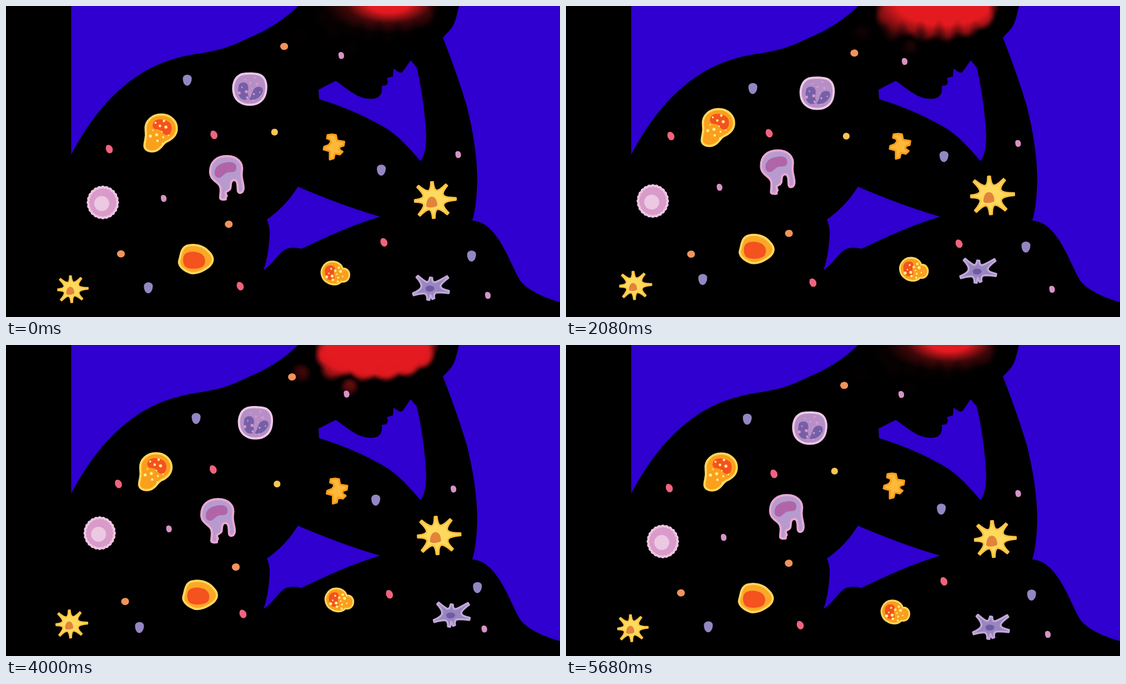
These frames come from a looping animation (998 by 561 pixels, 5.76 s). An HTML page with a canvas:

```html
<!DOCTYPE html>
<html lang="en">
<head>
<meta charset="utf-8">
<title>Drifting cells</title>
<style>
html, body { margin: 0; width: 100%; height: 100%; overflow: hidden; background: #000; }
canvas { display: block; width: 100vw; height: 100vh; }
</style>
</head>
<body>
<canvas id="stage" width="998" height="561"></canvas>
<script>
const ctx = document.getElementById('stage').getContext('2d');
const LOOP = 5760, STEP = 80, ORBIT = LOOP - STEP;
const TAU = Math.PI * 2;
const clamp = v => Math.max(0, Math.min(1, v));

// ---------- painting helpers ----------
const path = d => new Path2D(d);

function paint(shape, fill, edge, width) {
  ctx.fillStyle = fill;
  ctx.fill(shape);
  if (edge) {
    ctx.strokeStyle = edge;
    ctx.lineWidth = width;
    ctx.stroke(shape);
  }
}

// Grains spread over an ellipse in a sunflower spiral.
function grains(count, x, y, rx, ry) {
  const p = new Path2D();
  for (let i = 0; i < count; i++) {
    const d = Math.sqrt((i + 0.5) / count), a = i * 2.4, r = 1.4 + (i * 7 % 4) * 0.45;
    const gx = x + rx * d * Math.cos(a), gy = y + ry * d * Math.sin(a);
    p.moveTo(gx + r, gy);
    p.arc(gx, gy, r, 0, TAU);
  }
  return p;
}

// Rounded arms reaching out to the given tips.
function starPath(tips) {
  const p = new Path2D(), n = tips.length;
  const valley = i => {
    const [a, b] = tips[i % n], [c, d] = tips[(i + 1) % n];
    return [(a + c) * 0.29, (b + d) * 0.29];
  };
  p.moveTo(...valley(n - 1));
  tips.forEach(([x, y], i) => {
    const len = Math.hypot(x, y), nx = -y / len * 2, ny = x / len * 2;
    p.quadraticCurveTo(x * 0.55 - nx * 1.4, y * 0.55 - ny * 1.4, x - nx, y - ny);
    p.lineTo(x + nx, y + ny);
    p.quadraticCurveTo(x * 0.55 + nx * 1.4, y * 0.55 + ny * 1.4, ...valley(i));
  });
  p.closePath();
  return p;
}

function ruffle(rx, ry, bumps, depth) {
  const p = new Path2D();
  for (let i = 0; i < 180; i++) {
    const a = i / 180 * TAU, k = 1 + depth * Math.cos(a * bumps);
    p.lineTo(rx * k * Math.cos(a), ry * k * Math.sin(a));
  }
  p.closePath();
  return p;
}

const dot = (color, d) => {
  const p = path(d);
  return () => paint(p, color);
};

const cell = (body, fill, edge, width, core, coreFill, specks, speckFill) => () => {
  paint(body, fill, edge, width);
  if (core) paint(core, coreFill);
  if (specks) paint(specks, speckFill);
};

// ---------- cells ----------
const ORANGE = '#fb9f1c', RED = '#f4521f', YELLOW = '#ffd75a', CREAM = '#ffee90';

const lilac = cell(
  path('M-14 -27C-4 -29 12 -29 20 -25C30 -19 31 -6 29 5C27 18 17 28 2 28C-12 29 -24 22 -28 10C-32 -4 -29 -22 -14 -27Z'),
  '#b58fc6', '#ecc8e6', 4,
  path('M-20 -5C-20 -13 -5 -15 -3 -6C-1 2 -6 8 -1 15C-6 24 -25 20 -20 -5ZM-1 18C6 10 4 -2 14 -4C24 -6 26 3 21 9C16 18 4 22 -1 18Z'),
  '#7560a8', grains(12, 0, -1, 23, 23), '#d894cc');

const mast = cell(
  path('M1 -33C18 -33 30 -21 29 -6C28 6 18 13 10 16C3 20 2 28 -8 32C-20 36 -31 31 -29 20C-28 12 -25 8 -27 -5C-29 -22 -14 -33 1 -33Z'),
  ORANGE, YELLOW, 4,
  path('M-14 -16C-12 -27 6 -26 14 -20C23 -15 21 2 13 4C4 5 4 -5 -4 -6C-12 -6 -16 -10 -14 -16Z'),
  RED, grains(12, -2, -2, 20, 23), CREAM);

const legs = cell(
  path('M0 -39C18 -39 30 -28 27 -11C25 2 31 10 30 20C29 28 22 29 20 24C19 18 21 4 13 4C5 5 8 16 6 20C4 24 -2 24 -2 27C-2 31 2 33 -2 35L-2 39C-8 40 -12 39 -12 36C-12 30 -9 20 -13 14C-18 6 -30 4 -30 -11C-30 -29 -18 -39 0 -39Z'),
  '#b79bcf', '#e8a8d2', 4,
  path('M-22 -9C-22 -22 -8 -28 5 -28C17 -28 19 -20 16 -13C12 -8 5 -12 -2 -8C-8 -4 -10 1 -16 0C-21 -2 -22 -5 -22 -9Z'),
  '#b065a8');

const frilly = cell(ruffle(26.5, 27.7, 24, 0.025), '#d99bc9', '#eec6e2', 4,
  path('M-15.5 2a13.5 13.5 0 1 0 27 0a13.5 13.5 0 1 0 -27 0Z'), '#ecc8e2');

const yolk = cell(
  path('M-16 -24C-2 -28 14 -24 23 -13C33 -3 32 5 24 13C13 22 0 27 -10 25C-24 20 -33 11 -30 2C-27 -8 -27 -20 -16 -24Z'),
  '#fba827', YELLOW, 4,
  path('M-20 -9C-12 -16 4 -13 10 -9C18 -4 18 8 13 13C4 19 -14 19 -20 13C-25 5 -24 -4 -20 -9Z'), RED);

const amoeba = cell(
  path('M-12 -22L-4 -23L3 -22L5 -12L18 -10L17 -3L10 -1L9 4L15 8L10 13L1 11L-1 20L-8 22L-8 7L-19 4L-18 -1L-10 -4L-6 -9L-7 -14L-13 -16Z'),
  '#ffb93a', ORANGE, 3.5);

const bud = cell(
  path('M-6 -21C4 -21 12 -15 13 -8C20 -10 26 -3 25 5C24 13 17 17 11 15C5 22 -6 22 -14 17C-24 12 -28 -1 -23 -10C-19 -18 -12 -21 -6 -21Z'),
  ORANGE, YELLOW, 3.2,
  path('M-15 -12C-9 -17 1 -13 -1 -6C-6 2 2 6 -3 10C-8 14 -16 13 -18 4C-20 -4 -19 -10 -15 -12Z'),
  RED, grains(12, -1, 2, 18, 14), CREAM);

const violet = cell(
  starPath([[-23, -22], [2, -20], [32, -21], [34, 6], [6, 18], [-3, 20], [-30, 10]]),
  '#9787c0', '#c3a8d8', 3.5, path('M-8 0C-8 -7 6 -7 8 -1C8 6 -7 8 -8 0Z'), '#7359a5');

// Eight arms: diagonals a little longer, the right one longest.
const sunBody = starPath(Array.from({ length: 8 }, (_, i) => {
  const a = i / 8 * TAU - 0.05, len = i ? 33 + i % 2 * 4 : 42;
  return [len * Math.cos(a), len * Math.sin(a)];
}));
const sunCore = path('M-10 7C-10 -1 -7 -10 0 -10C7 -10 10 -2 10 6C6 10 -8 11 -10 7Z');
const sun = size => t => {
  const swell = 1.02 - 0.03 * Math.cos(t / LOOP * TAU);
  ctx.scale(size, size);
  ctx.save();
  ctx.translate(2, -4);
  ctx.scale(swell, swell);
  paint(sunBody, '#ffd95e', '#fdc03f', 3);
  ctx.restore();
  paint(sunCore, '#e2843a');
};

const peach = dot('#f2945a', 'M-7 0C-7 -8 6 -9 7 -1C8 8 -6 9 -7 0Z');
const plum = dot('#9486c2', 'M-8 -3C-8 -12 8 -12 8 -3C8 4 4 10 0 10C-5 10 -8 4 -8 -3Z');
const coral = dot('#f0647c', 'M-6 -4C-5 -10 4 -8 6 -1C8 8 -1 10 -4 5C-6 2 -7 0 -6 -4Z');
const rose = dot('#d893c6', 'M-5 -3C-4 -8 4 -7 5 -1C6 6 1 7 -2 6C-5 4 -5 0 -5 -3Z');
const gold = dot('#fbc552', 'M-6 0C-6 -8 6 -8 6 0C6 8 -6 8 -6 0Z');

// Everything circles once per loop around its own centre, starting at
// `turn` of a full circle; a negative ry reverses the direction.
const drifters = [];
function drift(draw, x, y, rx, ry, turn) {
  drifters.push(t => {
    const a = (turn + t / ORBIT) * TAU;
    ctx.save();
    ctx.translate(x + rx * Math.cos(a), y - ry * Math.sin(a));
    draw(t);
    ctx.restore();
  });
}

drift(peach, 512, 73, 11, 16, 0.5);
drift(peach, 405, 402, 9, 9, 0.32);
drift(peach, 216, 452, 10, -11, 0.57);
drift(plum, 335, 139, 10, 10, 0.41);
drift(plum, 675, 282, 9, 14, 0.77);
drift(plum, 248, 503, 10, 10, 0.91);
drift(plum, 838, 441, 12, -10, 0.24);
drift(coral, 192, 247, 11, -13, 0.34);
drift(coral, 371, 229, 5, -5, 0.12);
drift(coral, 694, 434, 15, -16, 0.58);
drift(coral, 432, 497, 13, 13, 0.61);
drift(rose, 609, 93, 6, 7, 0.41);
drift(rose, 284, 335, 10, -12, 0.25);
drift(rose, 812, 258, 6, 11, 0.82);
drift(rose, 869, 515, 8, 7, 0.73);
drift(gold, 493, 237, 12, -15, 0.61);
drift(lilac, 447, 150, 8, 10, 0.5);
drift(mast, 274, 225, 6, 6, 0.89);
drift(legs, 387, 308, 11, 10, 0.97);
drift(frilly, 166, 349, 10, -10, 0.09);
drift(yolk, 345, 448, 5, -10, 0.34);
drift(sun(0.735), 117, 509, 4, 5, 0.7);
drift(sun(1), 767, 349, 7, -5, 0.25);
drift(amoeba, 597, 257, 6, -7, 0.55);
drift(bud, 608, 473, 19, 14, 0.61);
drift(violet, 766, 492, 36, -18, 0.26);

// ---------- glow in the head ----------
const embers = [[587, 44, 23, 0.9], [619, 76, 18, 0.75], [531, 52, 20, 0.5]];
const sparks = [[707, 16, 8, 1200], [663, 25, 5, 1200], [685, 33, 6, 4480], [613, 12, 5, 4480]];

// Soft ellipse; stops are [offset, alpha] pairs.
function soft(x, y, rx, ry, rgb, stops) {
  const g = ctx.createRadialGradient(0, 0, 0, 0, 0, rx);
  for (const [at, alpha] of stops) g.addColorStop(at, `rgba(${rgb},${alpha})`);
  ctx.save();
  ctx.translate(x, y);
  ctx.scale(1, ry / rx);
  ctx.fillStyle = g;
  ctx.fillRect(-rx, -rx, rx * 2, rx * 2);
  ctx.restore();
}

function glow(t) {
  const level = 0.5 - 0.5 * Math.cos((t + STEP) / LOOP * 2 * TAU);
  const red = '227,26,31', black = '0,0,0';

  soft(668, -2, 114, 66, red, [[0, 1], [0.8, 1], [1, 0]]);
  for (let i = 1; i < 7; i++) {
    const a = i / 7 * Math.PI;
    soft(664 + 95 * Math.cos(a), 44 * Math.sin(a), 24, 26, red, [[0, 1], [0.5, 0.9], [1, 0]]);
  }
  for (const [x, y, r, a] of embers) soft(x, y, r, r, red, [[0, a], [0.4, a * 0.9], [1, 0]]);

  // Fading opens gaps between the strands, then closes in from outside.
  const ragged = 0.75 * clamp(1.6 - 1.7 * level);
  for (let i = 0; i < 7; i++) soft(573 + i * 33, 58, 14, 34, black, [[0, ragged], [1, 0]]);

  const reach = 36 + 95 * level, outer = reach + 80 + 100 * level;
  const shade = ctx.createRadialGradient(0, 0, reach, 0, 0, outer);
  shade.addColorStop(0, 'rgba(0,0,0,0)');
  shade.addColorStop(0.5, 'rgba(0,0,0,.72)');
  shade.addColorStop(1, 'rgba(0,0,0,.97)');
  ctx.save();
  ctx.translate(690 - 18 * level, -5);
  ctx.scale(1, 0.47);
  ctx.fillStyle = shade;
  ctx.fillRect(-250, 0, 400, 260);
  ctx.restore();

  for (const [x, y, r, at] of sparks) {
    const a = clamp(1 - Math.abs(t - at) / 240);
    soft(x, y, r, r, '255,150,70', [[0, a], [0.4, a * 0.8], [1, 0]]);
    soft(x, y, r * 0.55, r * 0.55, '255,240,170', [[0, a], [0.4, a], [1, 0]]);
  }
}

// ---------- gaps around the figure ----------
const gaps = path(
  'M117.5 0H526C500 26 470 44 436 58C405 73 390 79 345 86C320 90 300 95 278 104C205 134 153 200 117.5 268Z' +
  'M816 0C813 12 811 24 806 34C801 44 793 50 787 57C800 90 817 136 830 180C842 228 849 275 849 315C848 345 846 366 840 387' +
  'C862 388 877 405 890 425C904 447 915 476 926 495C938 511 965 525 998 534V0Z' +
  'M594 135L563 151L564 168C610 182 655 202 690 224C712 239 730 261 747 280C755 268 757 250 757 235C755 190 748 145 740 111' +
  'L729 98L715 118Q712 122 707 119L698 113L697 127L686 130Q690 137 685 143L677 144C678 152 677 159 671 164' +
  'C661 171 640 167 625 157C612 149 605 142 594 135Z' +
  'M526 326C570 345 625 366 674 380C620 396 575 418 532 438C520 435 508 435 500 441C487 451 478 468 464 476' +
  'C471 456 475 428 475 408Q474 394 470 385C492 370 510 351 526 326Z');

function render(t) {
  ctx.fillStyle = '#000';
  ctx.fillRect(0, 0, 998, 561);
  glow(t);
  paint(gaps, '#2f00cf');
  ctx.lineJoin = 'round';
  for (const draw of drifters) draw(t);
}

const start = performance.now();
function tick() {
  const t = (performance.now() - start) % LOOP;
  render(Math.floor(t / STEP) * STEP);
  requestAnimationFrame(tick);
}
tick();
</script>
</body>
</html>
```
